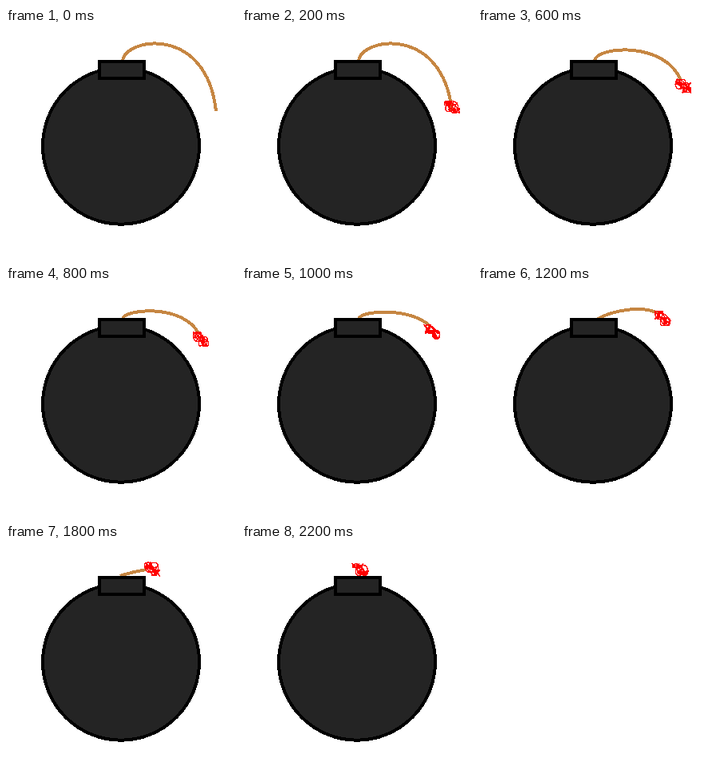
Animation, 288 px wide and 288 px high, one loop 2400 ms. Source, as an HTML page:

```html
<!DOCTYPE html>
<html lang="en">
<head>
<meta charset="utf-8">
<title>Bomb</title>
<style>
  html, body { margin: 0; width: 100%; height: 100%; overflow: hidden; background: #fff; }
  svg { display: block; width: 100%; height: 100%; fill: none; shape-rendering: crispEdges; }
</style>
</head>
<body>
<svg viewBox="0 0 288 288">
  <circle cx="144" cy="147.7" r="98" fill="#242424" stroke="#000" stroke-width="4"/>
  <path id="fuse" stroke="#c68642" stroke-width="4"/>
  <path id="spark" stroke="#f00" stroke-width="1.4" stroke-linejoin="round"/>
  <rect x="116.5" y="41.5" width="56" height="21" fill="#242424" stroke="#000" stroke-width="4"/>
</svg>
<script>
const STEP = 200;

// Each pose: fuse curve, then the centre of the spark
const poses = [
  ['M146 41C150 12 251 -4 263 104'],
  ['M146 41C150 12 251 -4 263 104', 263, 99],
  ['M146 41C150 15 243 12 260 79', 261, 85.5],
  ['M146 41C149 22 236 17 254 66', 257, 72.5],
  ['M146 41C150 28 222 23 241 59', 244, 66.5],
  ['M146 41C150 30 212 27 235 50', 238, 57.5],
  ['M150 41C165 33 202 22 228 35', 231, 40.5],
  ['M146 41C165 34 185 28 204 28', 211, 29.5],
  ['M143 40C158 35 173 32 190 30', 196, 31],
  ['M143 40Q158 35 176 32', 183, 31.5],
  ['M146 40Q154 36 162 34', 169, 32],
  ['', 148, 32]
];

// A tangled loop whose shape depends on the seed
function scribble(cx, cy, seed) {
  const points = [];
  for (let a = 0; a < 27; a += 0.15) {
    const x = cx + 6.3 * Math.cos(a + seed) + 3.6 * Math.cos(2.7 * a + seed * 2);
    const y = cy + 5.6 * Math.sin(1.1 * a + seed) + 3.4 * Math.sin(3.3 * a - seed);
    points.push(x.toFixed(1) + ' ' + y.toFixed(1));
  }
  return 'M' + points.join('L');
}

const fuse = document.getElementById('fuse');
const spark = document.getElementById('spark');
let shown = -1;

function draw() {
  const i = Math.floor(performance.now() / STEP) % poses.length;
  if (i !== shown) {
    const [curve, x, y] = poses[i];
    fuse.setAttribute('d', curve);
    spark.setAttribute('d', x ? scribble(x, y, i * 1.7) : '');
    shown = i;
  }
  requestAnimationFrame(draw);
}
draw();
</script>
</body>
</html>
```
